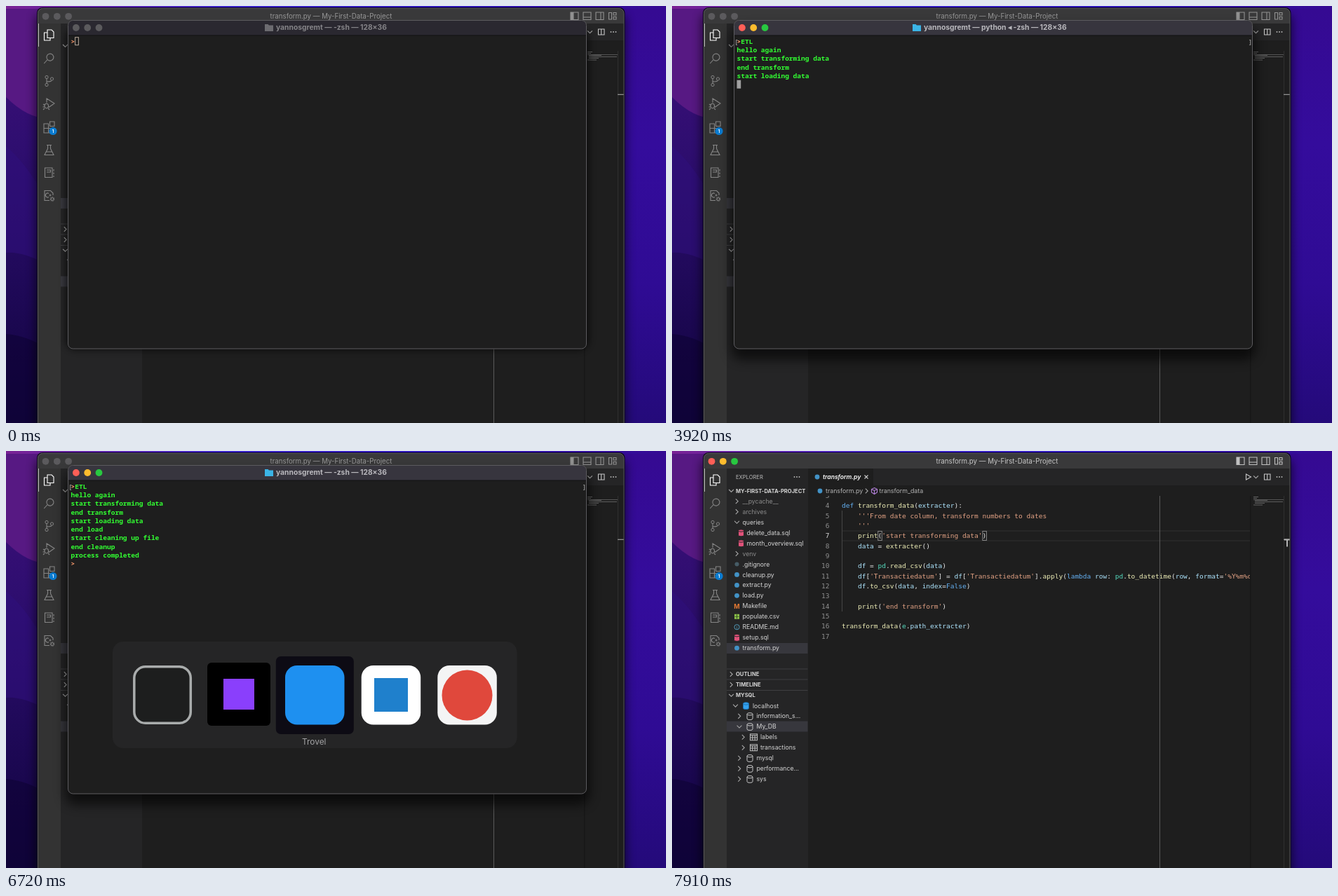
An HTML page that plays this animation: 941x595 px, repeating every 8000 ms.

```html
<!DOCTYPE html>
<html lang="en">
<head>
<meta charset="utf-8">
<title>Running a script from the terminal</title>
<style>
  html, body { margin: 0; width: 100%; height: 100%; overflow: hidden; background: #1b0a50; }
  svg { display: block; width: 941px; height: 595px; }
  text { white-space: pre; font-family: Inter, sans-serif; }
  .mono { font-family: "DejaVu Sans Mono", monospace; font-size: 9.52px; }
  .shell { font-family: "Noto Sans Mono", monospace; font-size: 9.54px; font-weight: 600; }
  .line { fill: none; stroke: #858585; stroke-width: 1.1; }
  .lights circle { fill: #5b5a5d; }
  .active .lights :nth-child(1) { fill: #ff5f57; }
  .active .lights :nth-child(2) { fill: #febc2e; }
  .active .lights :nth-child(3) { fill: #28c840; }
  .caption { fill: #858488; }
  #terminal .bar { fill: #2a2830; }
  #terminal.active .bar { fill: #37353e; }
  #terminal.active .caption { fill: #b9b8bd; }
  .folder { fill: #6c6b70; }
  #terminal.active .folder { fill: #3bb4e6; }
  #chrome { opacity: .65; }
  #chrome.bright { opacity: 1; }
  #codeShadow { filter: blur(7px); opacity: .6; }
  #shadow { filter: blur(4px); opacity: .5; }
  #shadow.deep { filter: blur(8px); opacity: .6; }
</style>
</head>
<body>
<svg id="stage" viewBox="0 0 941 595"></svg>
<script>
const rect = (x, y, w, h, fill, more = '') =>
  `<rect x="${x}" y="${y}" width="${w}" height="${h}" fill="${fill}" ${more}/>`;
const circle = (x, y, r, fill, more = '') =>
  `<circle cx="${x}" cy="${y}" r="${r}" fill="${fill}" ${more}/>`;
const line = (d, stroke = '#858585', more = '') =>
  `<path class="line" d="${d}" style="stroke:${stroke}" ${more}/>`;
const text = (x, y, s, size, fill = '#d6d6d6', more = '') =>
  `<text x="${x}" y="${y}" font-size="${size}" fill="${fill}" ${more}>${s}</text>`;
const group = (more, ...parts) => `<g ${more}>${parts.join('')}</g>`;
const right = (x, y) => line(`M${x - 1.7} ${y - 3.4}l3.4 3.4-3.4 3.4`, '#a8a8a8');
const down = (x, y) => line(`M${x - 3.4} ${y - 1.7}l3.4 3.4 3.4-3.4`, '#a8a8a8');
const dots = (x, y) => [-3.5, 0, 3.5].map(d => circle(x + d, y, .9, '#bbb')).join('');
const lights = (x, y) =>
  group('class="lights"', ...[0, 16.3, 32.6].map(d => circle(x + d, y, 4.9, '')));

// Desktop
const gradient = (id, stops, axis = 'x2="0" y2="1"') =>
  `<linearGradient id="${id}" ${axis}>` +
  stops.map((c, i) => `<stop offset="${i / (stops.length - 1)}" stop-color="${c}"/>`).join('') +
  '</linearGradient>';

const desktop = group('',
  '<defs>',
  gradient('left', ['#40107c', '#2f0e70', '#1f0958', '#11043e']),
  gradient('right', ['#350a92', '#340c9c', '#2f0b94', '#240a7a']),
  gradient('top', ['#7a2394', '#3a24cc', '#3018bc', '#350a92'], ''),
  '<clipPath id="editorClip"><rect x="194" y="64" width="631" height="531"/></clipPath></defs>',
  rect(0, 0, 470, 595, 'url(#left)'),
  rect(470, 0, 471, 595, 'url(#right)'),
  '<path d="M0 0H122Q110 90 70 160Q35 165 0 130Z" fill="#571983"/>',
  '<path d="M0 200Q30 225 60 280V370Q25 350 0 352Z" fill="#300f7c" opacity=".6"/>',
  '<path d="M0 468Q30 470 60 490V595H0Z" fill="#0e0334" opacity=".6"/>',
  rect(0, 0, 941, 4, 'url(#top)'));

// Sidebar
const drum = (x, y, color, fill = 'none') =>
  `<path d="M${x - 4} ${y - 3}v6.5a4 1.7 0 0 0 8 0v-6.5a4 1.7 0 0 0-8 0a4 1.7 0 0 0 8 0" fill="${fill}" stroke="${color}"/>`;
const grid = (x, y) =>
  line(`M${x - 5} ${y - 4.5}h10v9h-10zm0 2h10m-10 3.2h10m-6.8-3.2v7m3.5-7v7`, '#bbb');
const icons = {
  py: (x, y) => circle(x, y, 3.4, '#4292c6'),
  git: (x, y) => circle(x, y, 3, '#465c66'),
  sql: (x, y) => drum(x, y, '#252526', '#e0527a'),
  make: (x, y) => text(x, y + 3.3, 'M', 9, '#e37933', 'font-weight="700" text-anchor="middle"'),
  csv: (x, y) => rect(x - 3.5, y - 3.5, 7, 7, '#8dc149') + line(`M${x} ${y - 3}v6m-3-3h6`, '#3c5a28'),
  info: (x, y) => circle(x, y, 3.6, 'none', 'stroke="#519aba"') + text(x, y + 2.5, 'i', 6.5, '#519aba', 'text-anchor="middle"'),
  server: (x, y) => drum(x, y, '#1c6fb0', '#35a2ee'),
  db: (x, y) => drum(x, y, '#c5c5c5'),
  table: grid, right, down,
};
// label, text x, icon, outer chevron
const files = [
  ['__pycache__', 100.5, 'right'], ['archives', 100.5, 'right'], ['queries', 100.5, 'down'],
  ['delete_data.sql', 106.5, 'sql'], ['month_overview.sql', 106.5, 'sql'], ['venv', 100.5, 'right'],
  ['.gitignore', 100.5, 'git'], ['cleanup.py', 100.5, 'py'], ['extract.py', 100.5, 'py'],
  ['load.py', 100.5, 'py'], ['Makefile', 100.5, 'make'], ['populate.csv', 100.5, 'csv'],
  ['README.md', 100.5, 'info'], ['setup.sql', 100.5, 'sql'], ['transform.py', 100.5, 'py'],
];
const databases = [
  ['localhost', 115, 'server', 'down'], ['information_s...', 120.5, 'db', 'right'],
  ['My_DB', 120.5, 'db', 'down'], ['labels', 126, 'table', 'right'],
  ['transactions', 126, 'table', 'right'], ['mysql', 120.5, 'db', 'right'],
  ['performance...', 120.5, 'db', 'right'], ['sys', 120.5, 'db', 'right'],
];
const muted = ['__pycache__', 'archives', 'venv'];
const rows = (list, top) => list.map(([label, x, icon, chevron], i) => {
  const y = top + i * 14.96;
  return icons[icon](x - (chevron ? 9.5 : 8), y) + (chevron ? icons[chevron](x - 24.5, y) : '') +
    text(x, y + 3.1, label, 8.7, muted.includes(label) ? '#8c8c8c' : '#d6d6d6');
}).join('');
const heading = (y, label, chevron) =>
  chevron(84.5, y) + text(91, y + 2.8, label, 7.6, '#d6d6d6', 'font-weight="700"');

const sidebar = group('',
  rect(78, 25, 116, 570, '#252526'),
  rect(78, 274, 115.5, 15, '#37373d'), rect(78, 385.5, 115.5, 15, '#37373d'),
  text(91, 40, 'EXPLORER', 7.6, '#bbb'), dots(178, 37),
  heading(56.7, 'MY-FIRST-DATA-PROJECT', down), rows(files, 71.7),
  ...[310.5, 325.5, 341].map(y => rect(78, y, 115.5, 1, '#3f3f41')),
  heading(318.5, 'OUTLINE', right), heading(333.5, 'TIMELINE', right),
  heading(348.5, 'MYSQL', down), rows(databases, 363.4));

const activityBar = group('',
  rect(45, 25, 33, 570, '#333'), rect(45, 25, 1.6, 33, '#fff'),
  line('M59 34h6l3 3v8.500h-9zM59 38h-4.500v11h8.500v-3.500', '#fff', 'stroke-width="1.4"'),
  line('M59.200 76.500a5 5 0 1 1 8.500-2a5 5 0 0 1-8.500 2l-5 5.500'),
  line('M58 103.500v7M58 108q6.500 0 7-1.500'),
  ...[[58, 101.5], [58, 112.5], [65.5, 104]].map(([x, y]) => circle(x, y, 2.1, 'none', 'stroke="#858585"')),
  line('M58 138v-6l11 7-8 5.500M55 142a2.800 3.300 0 1 0 5.500 0a2.800 3.300 0 0 0-5.500 0M53 140l2 1.500m-2.500 2.500h2.500m-2 4l2-2m7.500-2h-2.500m2 4l-2-2'),
  line('M54 168h6.500v6.500h6.500v6.500h-13zM54 174.500h6.500v6.500M62.500 165h6.500v6.500h-6.500z'),
  circle(67, 178.5, 5.6, '#0a7bd0'),
  text(67, 181, '1', 6.8, '#fff', 'text-anchor="middle" font-weight="600"'),
  line('M58 198.500h7M59.500 198.500v5l-4.500 9h13l-4.500-9v-5M57.500 208h8'),
  line('M55.500 231h10.500v13.500h-10.500zM58 234h5.500v3h-5.500M68 233v2.500m0 2v2.500m0 2v2'),
  line('M62 277.500h-7v-14h8.500l3.500 3.500v3M61 267.500a3 3 0 1 0 0 5m2-4v3m-1.500-1.500h3'),
  circle(66, 275.5, 2.2, 'none', 'stroke="#858585" stroke-width="2" stroke-dasharray="1.2 .6"'));

// Editor
const source = {
  4: 'def transform_data(extracter):',
  5: "    '''From date column, transform numbers to dates",
  6: "    '''",
  7: "    print('start transforming data')",
  8: '    data = extracter()',
  10: '    df = pd.read_csv(data)',
  11: "    df['Transactiedatum'] = df['Transactiedatum'].apply(lambda row: pd.to_datetime(row, format='%Y%m%d'))",
  12: '    df.to_csv(data, index=False)',
  14: "    print('end transform')",
  16: 'transform_data(e.path_extracter)',
};
// string, keyword, module, function, variable
const palette = ['#e3a284', '#64b0f2', '#55dcc0', '#efefb8', '#aee6ff'];
const highlight = s => s.replace(
  /('''.*|'[^']*')|\b(def|lambda|False)\b|\b(pd|e)\b|(\w+(?=\())|(\w+)/g,
  (word, ...found) => `<tspan fill="${palette[found.findIndex(Boolean)]}">${word}</tspan>`);
const lineY = n => 81.4 + (n - 4) * 14.32;
const numbers = Array.from({ length: 15 }, (_, i) => i + 3);
const bracket = x => rect(x, 114.5, 5.6, 13, 'none', 'stroke="#888"');

const editor = group('',
  rect(194, 25, 687, 570, '#1e1e1e'), rect(287, 25, 594, 24, '#252526'),
  icons.py(207, 37),
  text(215, 40.2, 'transform.py', 8.6, '#fff', 'font-style="italic" font-weight="600"'),
  line('M274.500 34.500l5 5m0-5l-5 5', '#ccc'),
  icons.py(211, 57), text(219, 60, 'transform.py', 8.8, '#b4b4b4'), right(277.5, 57),
  line('M288.500 52.500l4 2v4.500l-4 2.500-4-2.500v-4.500zM284.500 54.500l4 2 4-2m-4 2v5', '#b180d7'),
  text(295.5, 60, 'transform_data', 8.8, '#b4b4b4'),
  line('M818.500 33l7 4-7 4z', '#c5c5c5'), down(832.5, 37),
  line('M844.500 33h8.500v8h-8.500zm4.250 0v8', '#c5c5c5'), dots(866, 37),
  group('clip-path="url(#editorClip)"',
    rect(242, 113.5, 583, 1, '#303030'), rect(242, 127.5, 583, 1, '#303030'),
    rect(242, 85, 1, 144, '#454545'),
    ...numbers.map(n => text(224.5, lineY(n), n, 9.52, n === 7 ? '#dadada' : '#8f8f8f', 'class="mono" text-anchor="end"')),
    ...Object.entries(source).map(([n, s]) => text(242, lineY(+n), highlight(s), 9.52, '#e6e6e6', 'class="mono"'))),
  rect(695, 64, 1, 531, '#5a5a5a'),
  rect(824, 64, 1.5, 531, '#171717'), rect(872, 64, 1, 531, '#303030'),
  ...[[829, 65, 7], [829, 67, 5], [829, 69, 15], [831, 70, 18], [831, 72, 40], [831, 74, 14], [829, 76.5, 13]]
    .map(([x, y, w]) => rect(x, y, w, 1, '#767676', 'opacity=".75"')),
  rect(829, 69, 43, 1, '#555'),
  rect(872, 125.7, 9, 1.3, '#909090'),
  group('id="focusMarks"', bracket(293.7), bracket(442.8),
    rect(873, 125.5, 8, 2, '#b5b5b5'), rect(876, 126, 2, 10.5, '#b5b5b5')),
  rect(448.5, 114, 1.3, 14, '#ddd', 'id="caret"'));

const codeWindow = group('id="code"',
  rect(42, 12, 842, 620, '#000', 'id="codeShadow" rx="8"'),
  rect(44, 2, 838.5, 620, '#0b0618', 'rx="8"'),
  rect(45, 3, 836, 620, '#39393a', 'rx="7"'),
  activityBar, sidebar, editor,
  lights(56.5, 14.8),
  group('id="chrome"',
    text(463.5, 17.7, 'transform.py — My-First-Data-Project', 9.7, '#c8c8c8', 'text-anchor="middle"'),
    ...[805, 823, 841].map(x => line(`M${x} 9h11v10.500h-11z`, '#c0c0c0')),
    rect(805, 9, 4.5, 10.5, '#c0c0c0'), line('M823 16h11M848 9v10.500', '#c0c0c0'),
    line('M859.500 9.500h4v9.500h-4zM866 9.500h4v3.500h-4zM866 15.500h4v3.500h-4z', '#c0c0c0')),
  rect(45.5, 3.5, 835.5, 620, 'none', 'rx="7" stroke="#59595b"'));

// Terminal
const COL = 5.725, ROW = 12.28;
const output = [
  [3150, 'hello again'], [3220, 'start transforming data'], [3920, 'end transform'],
  [3920, 'start loading data'], [4060, 'end load'], [4060, 'start cleaning up file'],
  [4130, 'end cleanup'], [4130, 'process completed'],
];
const shell = (col, row, s, fill, more = '') =>
  text(92.5 + col * COL, 53.8 + row * ROW, s, 9.54, fill, `class="shell" ${more}`);
const prompt = (row, more) => shell(0, row, '&gt;', '#ff9d6e', `style="font-weight:700" ${more}`);

const terminal = group('id="terminal"',
  rect(84, 30, 748, 473, '#000', 'id="shadow" rx="16"'),
  rect(88.5, 20.5, 739, 469, '#1e1e1e', 'rx="7"'),
  '<path class="bar" d="M89 42V28q0-7 7-7H820q7 0 7 7V42Z"/>',
  rect(89, 41.5, 738, 1, '#111'),
  lights(99.9, 31),
  group('id="caption"',
    '<path class="folder" d="M369 26h4.500l1.500 1.500h6v8.500h-12z"/>',
    text(385, 34.4, '', 10.3, '', 'id="captionText" class="caption" font-weight="700"')),
  prompt(0, ''), shell(1, 0, '', '#32ff32', 'id="typed"'),
  group('id="brackets"', shell(-.65, 0, '[', '#8a8a8a'), shell(127.4, 0, ']', '#8a8a8a')),
  ...output.map(([, s], i) => shell(0, i + 1, s, '#32ff32', `id="out${i}"`)),
  prompt(9, 'id="prompt2"'),
  rect(0, 0, 5.7, 12, '#a0a0a0', 'id="block"'),
  rect(98.6, 44.7, 4.8, 11, 'none', 'id="hollow" stroke="#b9a99b"'),
  rect(88.5, 20.5, 739, 468.5, 'none', 'rx="7" stroke="#5c5b5f"'));

// App switcher
const tile = (x, fill, more = '') => rect(x, 306, 84.5, 84.5, fill, `rx="17" ${more}`);
const switcher = group('id="switcher"',
  rect(152, 272, 576.5, 152, '', 'id="panel" rx="15"'),
  rect(0, 293, 111, 111, '#0d0b14', 'id="selection" rx="7"'),
  rect(182.8, 307.8, 80.5, 80.5, '#1d1e1e', 'rx="16" stroke="#a9acac" stroke-width="3.5"'),
  rect(287, 302, 90, 90, '#000', 'rx="6"'), rect(310, 325, 44, 44, '#8a3ffc'),
  tile(398, '#1e90f0'),
  tile(506.7, '#fff'), rect(525, 324, 48, 48, '#1f80cc'),
  tile(615.3, '#f4f4f4'), circle(657.5, 348.5, 36, '#e0483c'),
  text(0, 419, '', 11.9, '#a3a3a5', 'id="appName" text-anchor="middle"'));

const ibeam = 'M-3-6q3 0 3 2v8q0 2-3 2M3-6q-3 0-3 2v8q0 2 3 2M-2 1h4';
const pointer = group('id="pointer"',
  `<path d="${ibeam}" fill="none" stroke="#111" stroke-width="3"/>`,
  `<path d="${ibeam}" fill="none" stroke="#eee" stroke-width="1.3"/>`);

const stage = document.getElementById('stage');
stage.innerHTML = desktop + codeWindow + terminal + switcher + pointer;

const $ = id => document.getElementById(id);
const show = (id, on) => { $(id).style.display = on ? '' : 'none'; };
const set = (id, attrs) => { for (const k in attrs) $(id).setAttribute(k, attrs[k]); };
const apps = [['Framolo', 332], ['Trovel', 440.3], ['Script Garden Desk', 548.5]];

function pointerAt(t) {
  if (t >= 70 && t < 1960) {
    const left = Math.max(0, 1 - (t - 70) / 770) ** 3;
    return [144 + 170 * left, 57 + 120 * left];
  }
  if (t >= 4970 && t < 5110) {
    const k = (t - 4970) / 70;
    return [123 + 27 * k, 77 + 20 * k];
  }
}

function drawTerminal(t) {
  const active = t >= 910, running = t >= 3080 && t < 4200;
  const typed = 'ETL'.slice(0, [2030, 2240, 2450].filter(at => t >= at).length);
  const shown = output.filter(([at]) => t >= at).length;
  $('terminal').classList.toggle('active', active);
  $('shadow').classList.toggle('deep', active);
  set('shadow', { height: active ? 475 : 462 });
  $('captionText').textContent = `yannosgremt — ${running ? 'python ◂ ' : ''}-zsh — 128×36`;
  set('caption', { transform: `translate(${running ? -26 : 0})` });
  $('typed').textContent = typed;
  show('brackets', t >= 3080);
  output.forEach(([at], i) => show('out' + i, t >= at));
  show('prompt2', t >= 4200);

  const blink = [[1470, 1960], [5600, 6090], [6650, 7210]].some(([a, b]) => t >= a && t < b);
  const row = t < 3080 ? 0 : shown + 1;
  const col = t < 3080 ? 1 + typed.length : running ? 0 : 1;
  set('block', { x: 92.5 + col * COL, y: 44.3 + row * ROW });
  show('block', active && !blink);
  show('hollow', !active);
}

function draw(t) {
  const coding = t >= 7350;
  show('terminal', !coding);
  drawTerminal(t);

  $('code').classList.toggle('active', coding);
  $('chrome').classList.toggle('bright', t >= 7420);
  show('focusMarks', t >= 7420);
  show('caret', coding && t < 7910);

  const [name, x] = apps[t < 6650 ? 0 : t < 7070 ? 1 : 2];
  show('switcher', t >= 6020 && t < 7560);
  set('switcher', { opacity: Math.min(1, 1 - (t - 7350) / 210) });
  set('panel', { fill: coding ? '#29282d' : '#252526' });
  set('selection', { x: x - 55.5 });
  set('appName', { x: x - 1 });
  $('appName').textContent = name;

  const at = pointerAt(t);
  show('pointer', at);
  if (at) set('pointer', { transform: `translate(${at})` });
}

const start = performance.now();
function frame() {
  const t = (performance.now() - start) % 8000;
  draw(Math.floor(t / 70) * 70);
  requestAnimationFrame(frame);
}
frame();
</script>
</body>
</html>
```
